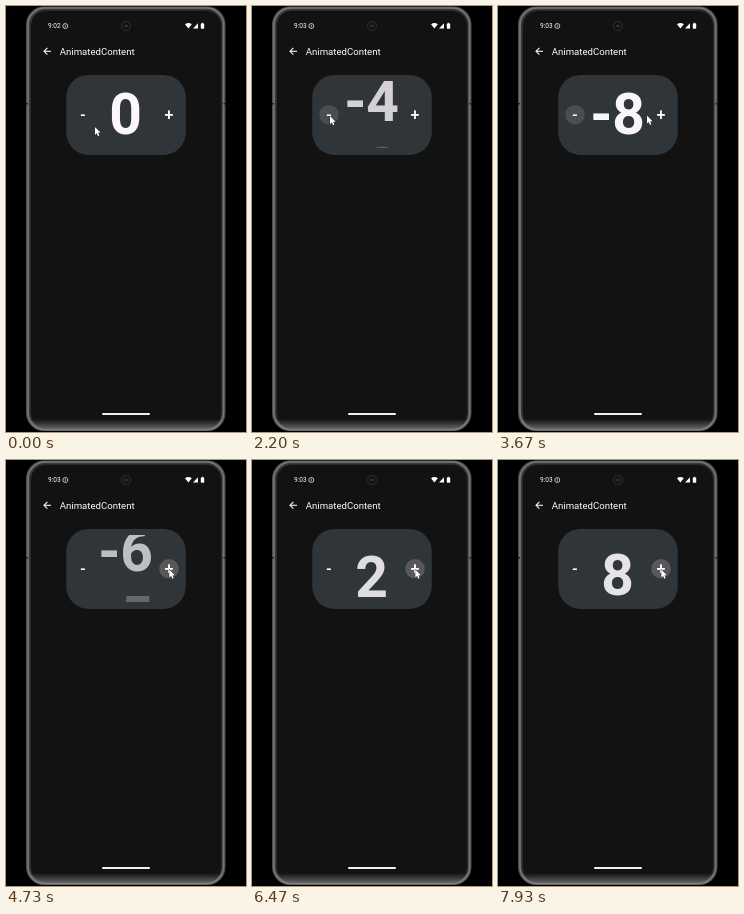
An HTML page with a canvas for the animation above (8 s loop, 240x426 px).

```html
<!DOCTYPE html>
<html lang="en">
<head>
<meta charset="utf-8">
<title>AnimatedContent counter</title>
<style>
  html, body { margin: 0; width: 100%; height: 100%; overflow: hidden; background: #000; }
  canvas { display: block; }
</style>
</head>
<body>
<canvas id="stage" width="240" height="426"></canvas>
<script>
const ctx = document.getElementById('stage').getContext('2d');
const LOOP = 8000;
const LINE = 67, TOP = 75, BASELINE = 128, CENTER = 120;
const DIGIT_FONT = '700 57px Roboto, sans-serif';

// Evenly spaced clicks on one button
const burst = (dir, count, start, step) =>
  Array.from({ length: count }, (_, i) => ({ dir, t: start + i * step }));

const clicks = [
  ...burst(-1, 1, 540, 0),
  ...burst(-1, 7, 1420, 315),
  ...burst(1, 10, 4218, 231),
  ...burst(1, 6, 6862, 176),
];

const clamp = v => Math.max(0, Math.min(1, v));
const mix = (a, b, p) => a + (b - a) * p;
const easeOut = (t, start, duration, power) => 1 - (1 - clamp((t - start) / duration)) ** power;

// Critically damped spring, stiffness 400
function spring(ms) {
  const u = Math.max(0, ms) / 50;
  return 1 - (1 + u) * Math.exp(-u);
}

function box(x, y, w, h, r, fill, stroke, lineWidth = 1) {
  ctx.beginPath();
  ctx.roundRect(x, y, w, h, r);
  if (fill) { ctx.fillStyle = fill; ctx.fill(); }
  if (stroke) { ctx.strokeStyle = stroke; ctx.lineWidth = lineWidth; ctx.stroke(); }
}

function disc(x, y, r, fill, stroke) {
  ctx.beginPath();
  ctx.arc(x, y, r, 0, 7);
  if (fill) { ctx.fillStyle = fill; ctx.fill(); }
  if (stroke) { ctx.strokeStyle = stroke; ctx.lineWidth = 0.8; ctx.stroke(); }
}

function shape(points, fill, stroke, close = true, lineWidth = 1) {
  ctx.beginPath();
  points.forEach(([x, y]) => ctx.lineTo(x, y));
  if (close) ctx.closePath();
  if (stroke) { ctx.strokeStyle = stroke; ctx.lineWidth = lineWidth; ctx.stroke(); }
  if (fill) { ctx.fillStyle = fill; ctx.fill(); }
}

function text(str, x, y, font, fill, align = 'left') {
  ctx.font = font;
  ctx.textAlign = align;
  ctx.fillStyle = fill;
  ctx.fillText(str, x, y);
}

function drawPhone() {
  ctx.fillStyle = '#000';
  ctx.fillRect(0, 0, 240, 426);
  box(20, 0.5, 199.5, 424.5, 18, '#4c4c4c');
  box(22, 2, 195.5, 421.5, 17, '#3a3a3a', '#777', 1.6);
  box(24.5, 4.5, 191, 418, 15, '#121212', '#2a2a2a');

  // Soft light along the bottom edge
  const glow = ctx.createLinearGradient(0, 413, 0, 425);
  glow.addColorStop(0, 'rgba(125,125,125,0)');
  glow.addColorStop(1, 'rgba(125,125,125,0.9)');
  box(21, 400, 197.5, 24.5, [0, 0, 17, 17], glow);

  ctx.fillStyle = '#1c1c1c';
  for (const x of [20, 217.5]) ctx.fillRect(x, 97, 2, 1.5);
}

function drawStatusBar(t) {
  text(t < 1600 ? '9:02' : '9:03', 42, 22.2, '400 6.5px Roboto, sans-serif', '#fff');
  disc(59.3, 20, 2.5, null, '#e4e4e4');
  shape([[59.3, 18.6], [59.3, 21.4]], null, '#ddd', false, 0.7);
  disc(120, 20, 5.2, '#262626');
  disc(120, 20, 3.8, '#141414');
  box(118, 19.2, 4, 1.6, 0.8, '#3c3a38');
  shape([[179, 18.3], [180.7, 17.3], [182.4, 17], [184.1, 17.3], [185.8, 18.3], [182.4, 22.6]], '#fff');
  shape([[187, 22.5], [192, 22.5], [192, 17.2]], '#fff');
  box(194.8, 17.5, 3.4, 5.2, 0.6, '#fff');
  box(195.7, 16.8, 1.6, 1, 0, '#fff');
}

function drawChrome() {
  shape([[45, 45.3], [38, 45.3]], null, '#f4f4f4', false, 1.1);
  shape([[41.4, 41.9], [38, 45.3], [41.4, 48.7]], null, '#f4f4f4', false, 1.1);
  text('AnimatedContent', 53.8, 48.5, '400 9.6px Roboto, sans-serif', '#fff');
  box(96, 407, 48, 2, 1, '#f0f0f0');
  box(60.2, 68.9, 119.6, 80.1, 22.5, '#2f3538');
}

function drawButton(label, x, glow) {
  if (glow > 0) disc(x, 108.7, 9.8, `rgba(255,225,232,${glow})`);
  text(label, x, 113.8, '500 16px Roboto, sans-serif', '#fff', 'center');
}

function drawCounter(t) {
  ctx.font = DIGIT_FONT;
  const visible = [];
  let value = 0, width = 0;
  for (let i = 0; i <= clicks.length; i++) {
    const from = clicks[i - 1], to = clicks[i];
    if (from) value += from.dir;
    const enter = from ? spring(t - from.t) : 1;
    const exit = to ? spring(t - to.t) : 0;
    const alpha = enter - exit;
    if (alpha < 0.002) continue;
    width += alpha * ctx.measureText(value).width;
    const shift = (from ? from.dir * (1 - enter) : 0) - (to ? to.dir * exit : 0);
    visible.push({ value, alpha, y: BASELINE + shift * LINE });
  }
  const left = CENTER - width / 2;
  ctx.save();
  ctx.beginPath();
  ctx.rect(left, TOP, width, LINE);
  ctx.clip();
  for (const { value, alpha, y } of visible) {
    ctx.globalAlpha = clamp(alpha);
    text(String(value), left - 0.4, y, DIGIT_FONT, '#fbf8fd');
  }
  ctx.restore();
}

function drawPointer(t) {
  const toMinus = easeOut(t, 0, 270, 2), toPlus = easeOut(t, 3560, 370, 5);
  const x = mix(mix(89, 78, toMinus), 163.3, toPlus);
  const y = mix(mix(121, 110, toMinus), 109.5, toPlus);
  const arrow = [[0, 0], [0, 8], [1.8, 6.4], [3.1, 9.3], [4.4, 8.7], [3.2, 5.9], [5.6, 5.7]];
  shape(arrow.map(([dx, dy]) => [x + dx, y + dy]), '#fff', '#222', true, 0.9);
}

function draw(t) {
  drawPhone();
  drawStatusBar(t);
  drawChrome();
  drawButton('-', 77, 0.14 * Math.min(clamp((t - 470) / 100), clamp((3800 - t) / 100)));
  drawButton('+', 163, 0.2 * clamp((t - 4070) / 100));
  drawCounter(t);
  drawPointer(t);
}

const start = performance.now();
function tick() {
  draw((performance.now() - start) % LOOP);
  requestAnimationFrame(tick);
}
tick();
</script>
</body>
</html>
```
